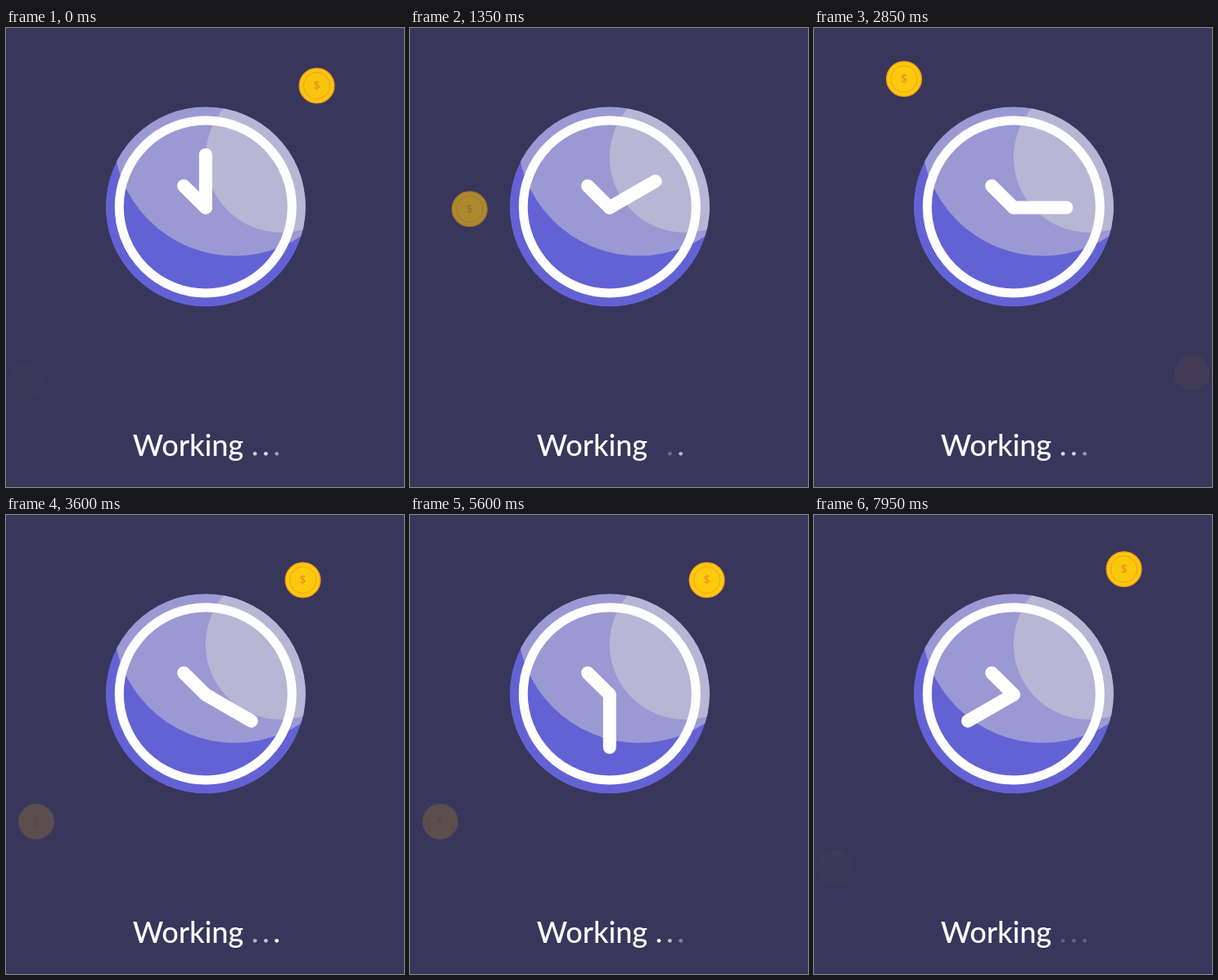
Write an HTML page that moves like this. It is 486 by 561 pixels and loops after 8000 ms.

```html
<!DOCTYPE html>
<html lang="en">
<head>
<meta charset="utf-8">
<title>Working</title>
<style>
  html, body { margin: 0; width: 100%; height: 100%; overflow: hidden; background: #39365b; }
  svg { display: block; width: 486px; height: 561px; }
  .label { font: 500 36px Lato, "Open Sans", sans-serif; fill: #fff; }
  .sign { font: 600 14px "Open Sans", Lato, sans-serif; fill: #f0911c; text-anchor: middle; }
  .hand { stroke: #fff; stroke-width: 16; stroke-linecap: round; }
</style>
</head>
<body>
<svg viewBox="0 0 486 561">
  <defs>
    <clipPath id="face"><circle cx="243.75" cy="218.5" r="122"/></clipPath>
    <g id="coin">
      <circle r="21.4" fill="#fdc90d" stroke="#f3981c" stroke-width="1.3"/>
      <circle r="16.2" fill="none" stroke="#f3a01a"/>
      <text class="sign" y="5">$</text>
    </g>
  </defs>
  <rect width="486" height="561" fill="#39365b"/>
  <use class="coin" href="#coin"/>
  <use class="coin" href="#coin"/>
  <g clip-path="url(#face)">
    <circle cx="243.75" cy="218.5" r="122" fill="#6362d5"/>
    <circle cx="279.5" cy="130" r="148.5" fill="#9b99d3"/>
    <circle cx="335.75" cy="158" r="92" fill="#b8b6d5"/>
  </g>
  <circle cx="243.75" cy="218.5" r="105.5" fill="none" stroke="#fff" stroke-width="11"/>
  <path class="hand" d="M243.75 219.5L217 193"/>
  <path class="hand" id="minute" d="M243.75 219.5V155"/>
  <text class="label" x="222.5" y="523" text-anchor="middle">Working</text>
  <g id="dots" fill="#fff">
    <circle cx="304" cy="520.3" r="2.4"/>
    <circle cx="317.3" cy="520.3" r="2.4"/>
    <circle cx="330.6" cy="520.3" r="2.4"/>
  </g>
</svg>
<script>
const LOOP = 8000, COIN_CYCLE = 2000, LAUNCH = 615, DOT_CYCLE = 3000;
const AXIS = 243.75;
// Coin stops as [distance from the axis, y]
const HOME = [0, 218], PEAK = [133.75, 62], END = [221.5, 437.5];

const coins = document.querySelectorAll('.coin');
const minute = document.getElementById('minute');
const dots = document.getElementById('dots').children;

const clamp = v => Math.min(1, Math.max(0, v));
const mix = (a, b, p) => a + (b - a) * p;

// Timing curve with control points (x1, 0) and (x2, 1)
const ease = (x1, x2) => x => {
  let lo = 0, hi = 1;
  for (let i = 0; i < 24; i++) {
    const s = (lo + hi) / 2, r = 1 - s;
    if (3 * r * r * s * x1 + 3 * r * s * s * x2 + s ** 3 < x) lo = s; else hi = s;
  }
  return lo * lo * (3 - 2 * lo);
};
const launchEase = ease(.6, .24), fallEase = ease(.583, .174), tickEase = ease(.42, .58);

// Dot opacities at each time within a cycle
const dotTimes = [0, 600, 1000, 1350, 1950, 2100, 2600, 3000];
const dotLevels = [
  [.76, .6, 0, 0, .2, .36, .95, .76],
  [.82, .7, .5, .28, .22, .4, .68, .82],
  [.5, .95, .8, .62, .22, .13, .38, .5]
];

function drawCoin(coin, side, time) {
  const u = (time + COIN_CYCLE) % COIN_CYCLE;
  const falling = u >= LAUNCH;
  const p = falling ? fallEase((u - LAUNCH) / (COIN_CYCLE - LAUNCH)) : launchEase(u / LAUNCH);
  const [from, to] = falling ? [PEAK, END] : [HOME, PEAK];
  const x = AXIS + side * mix(from[0], to[0], p);
  coin.setAttribute('transform', `translate(${x} ${mix(from[1], to[1], p)})`);
  coin.setAttribute('opacity', falling ? 1 - p : 1);
}

function draw(now) {
  const t = now % LOOP;
  drawCoin(coins[0], -1, t - 200);
  drawCoin(coins[1], 1, t - 1200);

  const tick = Math.floor(t / 1000) + tickEase(clamp((t % 1000 - 110) / 200));
  minute.setAttribute('transform', `rotate(${30 * tick} 243.75 219.5)`);

  const d = t % DOT_CYCLE;
  const i = dotTimes.findIndex(time => time > d);
  const p = (d - dotTimes[i - 1]) / (dotTimes[i] - dotTimes[i - 1]);
  dotLevels.forEach((levels, n) => dots[n].setAttribute('opacity', mix(levels[i - 1], levels[i], p)));
}

const start = performance.now();
function loop() {
  draw(performance.now() - start);
  requestAnimationFrame(loop);
}
loop();
</script>
</body>
</html>
```
